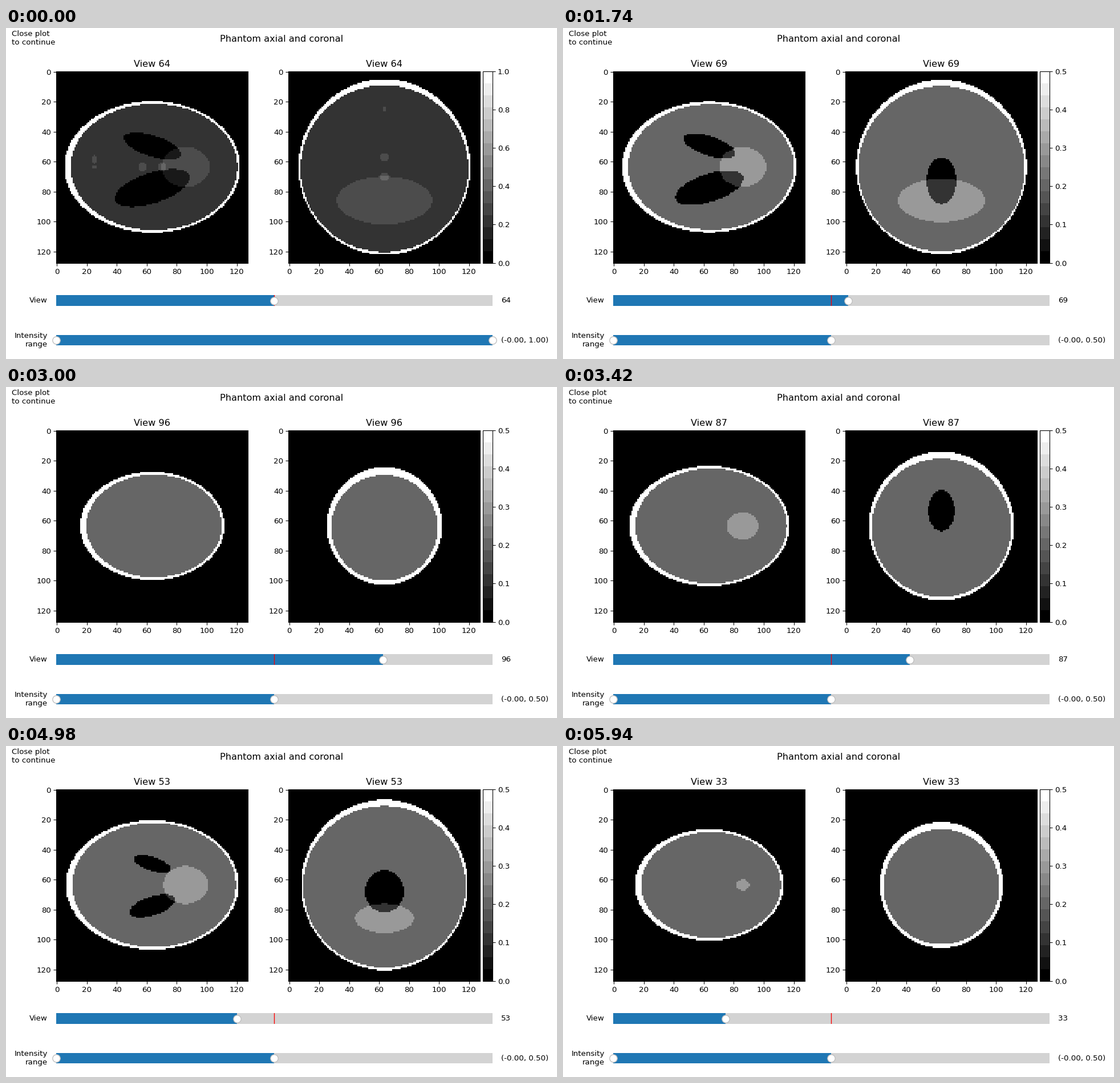
Animation of 966 by 580 pixels, one loop 6 s. Source, as a matplotlib script:

```python
import numpy as np
import matplotlib.pyplot as plt
from matplotlib.animation import FuncAnimation
from matplotlib.cm import ScalarMappable
from matplotlib.colors import Normalize
from matplotlib.widgets import RangeSlider, Slider

W, H, DPI = 966, 580, 96
N = 128
FRAMES, INTERVAL = 100, 60
QUARTER = FRAMES // 4
STEP = N / FRAMES  # views per frame

LEFT, WIDTH = 88.1, 764.5  # slider tracks
TOP, SIDE = 75.5, 336.1    # picture panels


def make_phantom():
    """Volume indexed as [z, x, y], built by adding ellipsoids."""
    t = np.linspace(-1, 1, N)
    z, x, y = np.meshgrid(t, t, t, indexing="ij", sparse=True)
    vol = np.zeros((N, N, N))

    def add(value, ry, rx, rz, y0=0, x0=0, tilt=0):
        c, s = np.cos(np.radians(tilt)), np.sin(np.radians(tilt))
        u = (y - y0) * c + (x - x0) * s
        w = (x - x0) * c - (y - y0) * s
        vol[(u / ry) ** 2 + (w / rx) ** 2 + (z / rz) ** 2 <= 1] += value

    add(1, .92, .69, .90)
    add(-.8, .95 * .92, .96 * .69, .88, y0=.0184)
    for s in (1, -1):  # unequal ventricles
        add(-.2, .36 + .05 * s, .135 + .025 * s, .215 - .005 * s,
            x0=.22 * s, tilt=-18 * s)
    add(.1, .25, .21, .5, y0=.35)
    for s in (1, -1):
        add(.1, .046, .046, .046, y0=.1 * s)
    for rx, x0 in ((.046, -.08), (.023, 0)):
        add(.1, .023, rx, .02, y0=-.605, x0=x0)
    return vol


def add_axes(left, top, width, height):
    return fig.add_axes([left / W, 1 - (top + height) / H, width / W, height / H])


def slices(view):
    return vol[view], vol[:, view].T


def view_at(k):
    """Hold the middle, climb for a quarter, then fall for two."""
    climb = max(0, QUARTER - abs(k - 2 * QUARTER)) if k < 2 * QUARTER else 3 * QUARTER - k
    return int(N / 2 + STEP * climb)


vol = make_phantom()
low = vol.min()

plt.rcParams["font.size"] = 10.06
fig = plt.figure(figsize=(W / DPI, H / DPI), dpi=DPI)
fig.suptitle("Phantom axial and coronal")
fig.text(.01, .95, "Close plot\nto continue")

panels = [add_axes(left, TOP, SIDE, SIDE) for left in (LEFT, 495.2)]
images = [
    ax.imshow(data, cmap="gray", vmin=0, vmax=1, interpolation="nearest")
    for ax, data in zip(panels, slices(N // 2))
]
titles = [ax.set_title("View 64") for ax in panels]

scale = ScalarMappable(Normalize(0, 1), plt.get_cmap("gray", 16))
fig.colorbar(scale, cax=add_axes(836.1, TOP, 16.6, SIDE))

view_slider = Slider(add_axes(LEFT, 459, WIDTH, 37), "View", 0, N,
                     valinit=N // 2, valfmt="%d")
range_slider = RangeSlider(add_axes(LEFT, 528.7, WIDTH, 37), "Intensity\nrange",
                           low, 1, valinit=(low, 1), valfmt="%.2f")
for slider in (view_slider, range_slider):
    slider.drawon = False


def update(k):
    view = view_at(k)
    top = 1 - .5 * min(k / QUARTER, 1)
    range_slider.set_val((low, top))
    view_slider.set_val(view)
    scale.set_clim(0, top)
    # the pictures take the new range only once the view moves
    shown = top if k > QUARTER else 1
    for im, title, data in zip(images, titles, slices(view)):
        im.set_data(data)
        im.set_clim(0, shown)
        title.set_text(f"View {view}")
    return images


anim = FuncAnimation(fig, update, frames=FRAMES, interval=INTERVAL,
                     init_func=lambda: update(0), repeat=True, repeat_delay=0)
plt.show()
```
